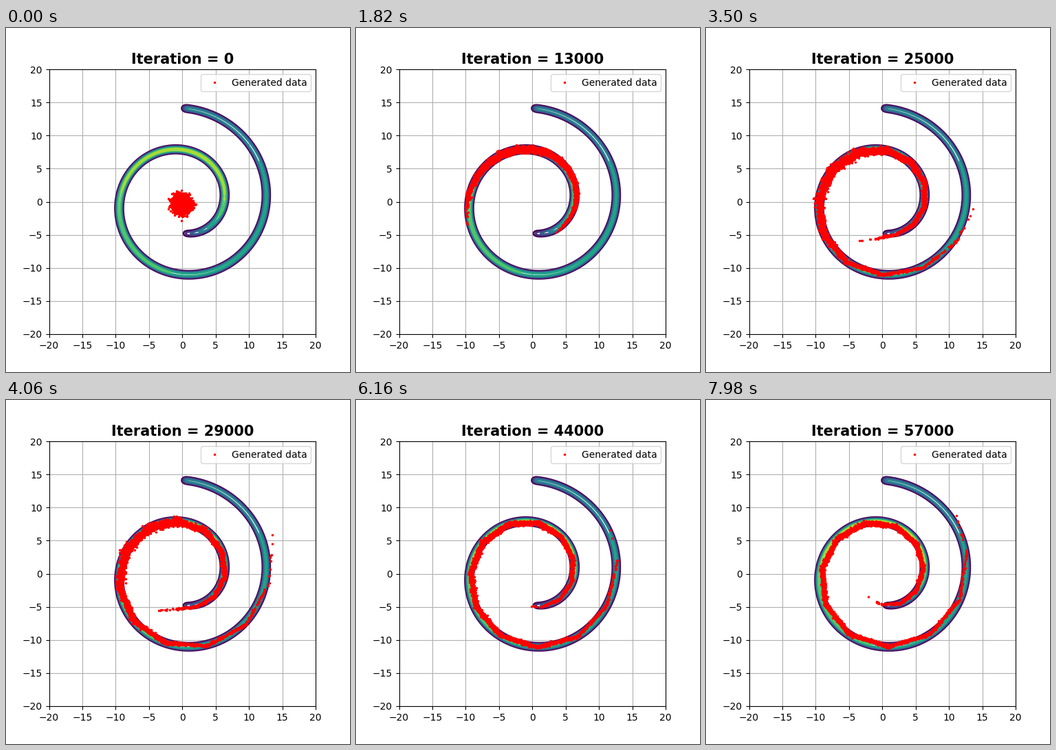
A matplotlib script that plays this animation: 500x500 px, repeating every 8000 ms.

```python
import numpy as np
import matplotlib.pyplot as plt
from matplotlib.animation import FuncAnimation

TICK = 20          # ms per animation frame
HOLD = 7           # frames each training snapshot stays
FRAMES = 400
SAMPLES = 5000
KNOTS = 17         # the generator's curve is a polyline
SIGMA = 0.31       # thickness of the spiral density

plt.rcParams["font.family"] = "DejaVu Sans"

# Reach of the samples along the spiral: angle and radial miss of both tips.
STEPS = [0, 6, 16, 20, 29, 35, 44, 57]
INNER = [6.34, 6.34, 4.9, 4.05, 3.96, 4.26, 4.44, 4.09]
INNER_MISS = [0, 0.3, 0.6, 4.5, 3.7, 1.85, 0.65, 0.2]
OUTER = [9.14, 9.14, 10.1, 12.13, 13.02, 13.1, 13.27, 13.41]
OUTER_MISS = [0, 0.6, 0.5, 1.5, 2.2, 1.0, 1.2, 2.2]


def polar(angle, r):
    return np.column_stack([r * np.cos(angle), r * np.sin(angle)])


def spiral_density(grid):
    """Gaussian ridge along the spiral, in units of the contour spacing."""
    t = np.linspace(4.77, 14.12, 900)
    peak = np.interp(t, [4.77, 5.4, 6.3, 7.5, 9.3, 11, 13.05, 14.12],
                     [2.2, 4.8, 7.0, 7.45, 7.0, 5.9, 5.0, 4.6])
    ds = np.sqrt(1 + t**2) * (t[1] - t[0])
    weight = peak * ds / (SIGMA * np.sqrt(2 * np.pi))
    gx, gy = (np.exp(-((grid[:, None] - c) / SIGMA) ** 2 / 2) for c in polar(t, t).T)
    return (gy * weight) @ gx.T


def generate(step):
    rng = np.random.default_rng(step)
    t0, miss0, t1, miss1 = (np.interp(step, STEPS, key)
                            for key in (INNER, INNER_MISS, OUTER, OUTER_MISS))
    grow = np.sin(np.pi / 2 * min(1, step / 3))

    # spiral polyline that drifts a little and strays at its tips
    k = np.arange(KNOTS)
    t = np.linspace(t0, t1, KNOTS)
    drift = 0.3 - 0.008 * step + 0.1 * np.sin(2.1 * t + 0.5 * step)
    stray = miss0 * np.exp(-1.4 * k) + miss1 * np.exp(-1.4 * k[::-1])
    knots = polar(t, grow * (t + drift + stray))

    u = rng.beta(3, 3, SAMPLES)
    points = np.column_stack([np.interp(u * (KNOTS - 1), k, c) for c in knots.T])

    # scatter: a round blob at first, later a band that swells on the left
    at = t0 + u * (t1 - t0)
    swell = 0.18 * np.exp(-((step - 23) / 12) ** 2 - (at - 8.8) ** 2 / 1.5)
    width = 0.56 * (1 - grow) + grow * (0.04 + 0.11 * np.sin(np.pi * u) + swell)
    points += width[:, None] * rng.standard_normal((SAMPLES, 2))
    return points + (1 - grow) * np.array([-0.15, -0.3])


fig, ax = plt.subplots(figsize=(5, 5), dpi=100)
ax.set(xlim=(-20, 20), ylim=(-20, 20),
       xticks=range(-20, 21, 5), yticks=range(-20, 21, 5))
ax.grid(True)
grid = np.linspace(-16, 16, 361)
ax.contour(grid, grid, spiral_density(grid), levels=range(1, 8),
           colors=plt.cm.viridis(np.linspace(0, 0.87, 7)), linewidths=2)
dots, = ax.plot([], [], "r.", markersize=3, label="Generated data")
ax.legend(loc="upper right")

# Everything but dots and title is static: render it once as a backdrop.
fig.canvas.draw()
backdrop = np.array(fig.canvas.buffer_rgba())
for artist in [*ax.collections, ax.get_legend()]:
    artist.remove()
ax.set_axis_off()
fig.figimage(backdrop, zorder=-1)

title = ax.set_title("", fontsize=15, fontweight="bold")
clouds = [generate(s) for s in range((FRAMES - 1) // HOLD + 1)]


def update(frame):
    step = frame // HOLD
    dots.set_data(*clouds[step].T)
    title.set_text(f"Iteration = {step * 1000}")
    return dots, title


anim = FuncAnimation(fig, update, frames=FRAMES, interval=TICK,
                     repeat=True, repeat_delay=0)
plt.show()
```
